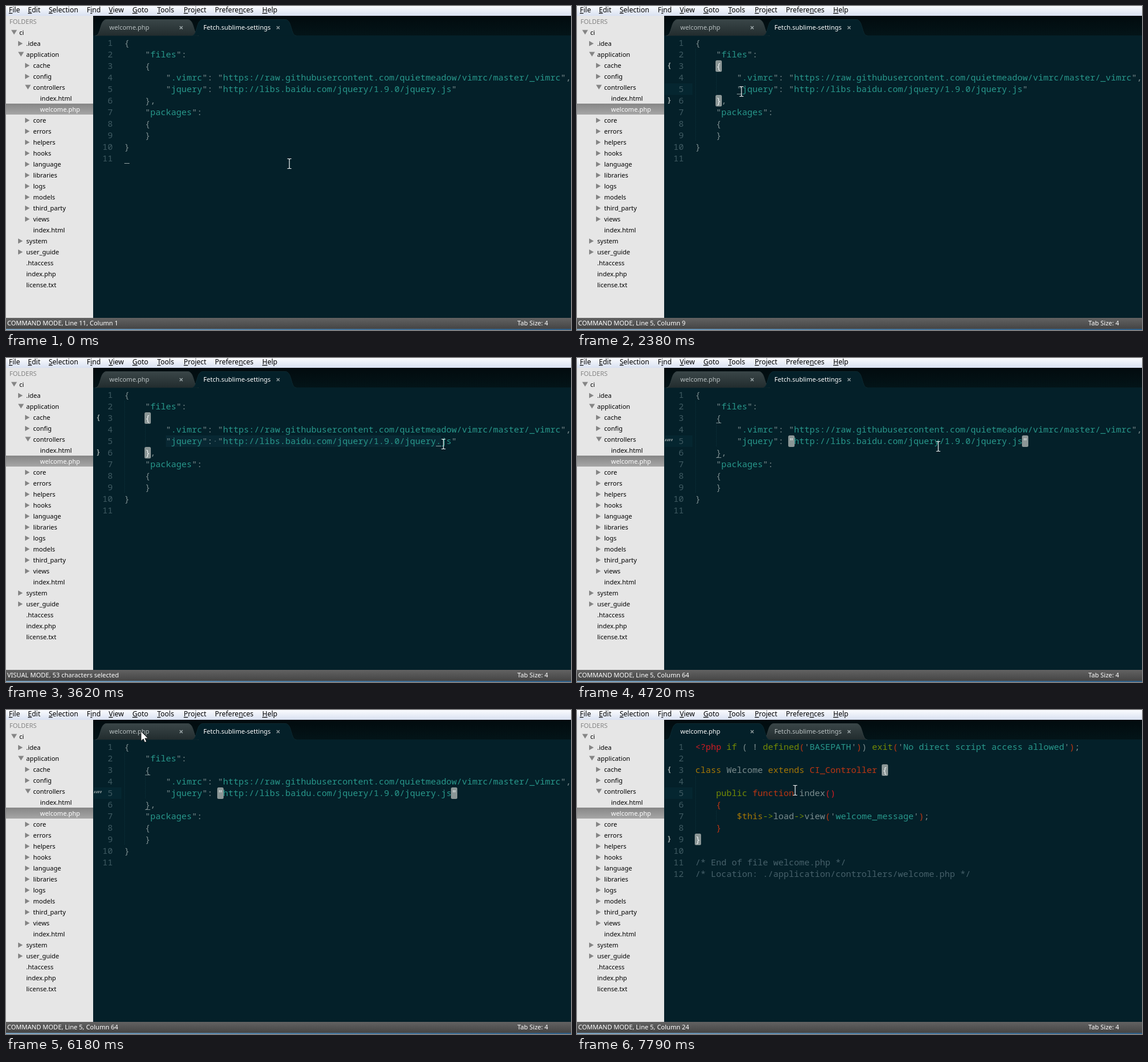
An HTML page for the animation above (8 s loop, 979x561 px).

```html
<!DOCTYPE html>
<html lang="en">
<head>
<meta charset="utf-8">
<title>Editor session</title>
<style>
  html, body { margin: 0; width: 100%; height: 100%; overflow: hidden; background: #042029; }
  svg { display: block; width: 979px; height: 561px; }
  text { white-space: pre; font: 11px "Noto Sans", "Open Sans", sans-serif; }
  .menu { font-size: 12px; }
  .menu tspan { text-decoration: underline; }
  .code { font: 15px "Noto Sans Mono", "Liberation Mono", monospace; fill: #7b8c8e; }
  .num { fill: #3f5a62; text-anchor: end; }
  .icon { font-weight: 700; font-size: 13px; fill: #93a1a1; }
  .marks { font-weight: 700; font-size: 16px; fill: #7d8c8e; }
  .lit { fill: #eef2f2; }
  .s { fill: #28978b; }
  .g { fill: #738a05; }
  .y { fill: #a57706; }
  .o { fill: #bd3613; }
  .r { fill: #d11c24; }
  .c { fill: #46606a; }
  .off { display: none; }
  .tab path { fill: url(#tabFill); stroke: #333f41; }
  .tab text { fill: #b9c1c2; }
  .tab .close { fill: none; stroke: #9aa5a7; stroke-width: 1.5; }
  .tab.active path { fill: #042029; stroke: #0d2931; }
  .tab.active text { fill: #fff; }
  .tab.active .close { fill: none; stroke: #8d999b; }
</style>
</head>
<body>
<svg id="stage" viewBox="0 0 979 561">
  <defs>
    <linearGradient id="menuFill" x2="0" y2="1"><stop stop-color="#fafbfe"/><stop offset="1" stop-color="#d9e1f1"/></linearGradient>
    <linearGradient id="tabFill" x2="0" y2="1"><stop stop-color="#3a4648"/><stop offset="1" stop-color="#222c2e"/></linearGradient>
    <linearGradient id="barFill" x2="0" y2="1"><stop stop-color="#020b0e"/><stop offset="1" stop-color="#031418"/></linearGradient>
    <linearGradient id="pickFill" x2="0" y2="1"><stop stop-color="#868686"/><stop offset="1" stop-color="#a6a6a6"/></linearGradient>
    <linearGradient id="statusFill" x2="0" y2="1"><stop stop-color="#626262"/><stop offset="1" stop-color="#454545"/></linearGradient>
    <linearGradient id="deskFill"><stop stop-color="#7fa6c4"/><stop offset=".5" stop-color="#4a7ba3"/><stop offset="1" stop-color="#2f5f88"/></linearGradient>
  </defs>
  <rect width="979" height="561" fill="#042029"/>
  <rect x="151" y="17" width="828" height="34" fill="url(#barFill)"/>
  <rect y="17" width="151" height="523" fill="#e6e6e6"/>
  <rect width="979" height="17" fill="url(#menuFill)"/>
  <g id="menu"></g>
  <g id="tree"></g>
  <g id="tabs"></g>
  <rect id="row5" x="152" y="134" width="48" height="20" fill="#052630"/>
  <g id="json"></g>
  <g id="php"></g>
  <rect id="caret" height="1" width="9" fill="#93a1a1"/>
  <rect y="540" width="979" height="19" fill="url(#statusFill)"/>
  <rect y="559" width="979" height="2" fill="url(#deskFill)"/>
  <text id="status" x="2" y="553" fill="#fff"></text>
  <text x="886" y="553" fill="#fff">Tab Size: 4</text>
  <path id="beam" d="M-3.5-8.5h2.5l1 1 1-1h2.5M0-7.500V7.500M-3.500 8.500h2.500l1-1 1 1h2.500" fill="none" stroke="#f4f6f6" stroke-width="1.2"/>
  <path id="arrow" d="M0 0V16.500L4 13 6.500 19 9.300 17.800 6.800 12H12Z" fill="#fff" stroke="#111" stroke-width=".8"/>
</svg>
<script>
const LOOP = 8000, CELL = 9, LEFT = 205;
const $ = id => document.getElementById(id);
const colX = col => LEFT + (col - 1) * CELL;
const rowTop = row => 54 + (row - 1) * 20;
const span = (cls, s) => `<tspan class="${cls}">${s}</tspan>`;

// Menu: the letter after & is underlined
const menu = [[5, '&File'], [38, '&Edit'], [74, '&Selection'], [140, 'F&ind'], [178, '&View'], [219, '&Goto'],
  [262, '&Tools'], [308, '&Project'], [362, 'Prefere&nces'], [444, '&Help']];
$('menu').innerHTML = menu.map(([x, s]) =>
  `<text class="menu" x="${x}" y="11">${s.replace(/&(.)/, '<tspan>$1</tspan>')}</text>`).join('');

// Sidebar: leading > give the depth, + closed folder, - open folder
const tree = `-ci|>+.idea|>-application|>>+cache|>>+config|>>-controllers|>>> index.html|>>> welcome.php|>>+core|>>+errors|
>>+helpers|>>+hooks|>>+language|>>+libraries|>>+logs|>>+models|>>+third_party|>>+views|>> index.html|>+system|
>+user_guide|> .htaccess|> index.php|> license.txt`.replace(/\n/g, '').split('|');
$('tree').innerHTML = '<text x="6" y="31" fill="#858585">FOLDERS</text>' + tree.map((item, i) => {
  const [, deep, kind, name] = item.match(/^(>*)([-+ ])(.*)$/);
  const x = 23 + 12 * deep.length, y = 46 + 19 * i, picked = name === 'welcome.php';
  const shape = { '+': 'v9l8-4.500z', '-': 'h10l-5 8z' }[kind];
  return (picked ? `<rect y="${y - 10}" width="151" height="19" fill="url(#pickFill)"/>` : '') +
    (shape ? `<path d="M${x - 14} ${y - 4.5}${shape}" fill="#858585"/>` : '') +
    `<text x="${x}" y="${y + 4}" fill="${picked ? '#fff' : '#000'}">${name}</text>`;
}).join('');

const tab = (id, a, b, textX, closeX, name) => `<g id="${id}" class="tab">
  <path d="M${a} 51.500C${a + 10} 51.500 ${a + 7} 23.500 ${a + 19} 23.500H${b - 19}C${b - 7} 23.500 ${b - 10} 51.500 ${b} 51.500"/>
  <text x="${textX}" y="41">${name}</text>
  <path class="close" d="M${closeX - 2.5} 35l5 5m0-5l-5 5" style="fill:none"/></g>`;
$('tabs').innerHTML = tab('tabPhp', 155, 334, 179, 303.5, 'welcome.php') +
  tab('tabJson', 322, 503, 342, 471.5, 'Fetch.sublime-settings');

// Code
const listing = lines => lines.map((s, i) => {
  const y = rowTop(i + 1) + 15;
  return `<text class="code num" x="185" y="${y}">${i + 1}</text><text class="code" x="${LEFT}" y="${y}">${s}</text>`;
}).join('');
const lit = (row, col, ch) => `<rect x="${colX(col) - 1}" y="${rowTop(row)}" width="11" height="20" rx="2.5" fill="#8b9696"/>
  <text class="code lit" x="${colX(col)}" y="${rowTop(row) + 15}">${ch}</text>`;
const icon = (row, s) => `<text class="code icon" x="156" y="${rowTop(row) + 13}">${s}</text>`;
const guide = (col, from, to) => `<path d="M${colX(col) + .5} ${rowTop(from)}V${rowTop(to) + 20}" stroke="#0d323b" stroke-dasharray="1 1"/>`;
const underline = row => `<rect x="241" y="${rowTop(row) + 18}" width="9" height="1" fill="#7b8c8e"/>`;
const fold = row => `<path d="M187 ${rowTop(row) + 5}h10l-5 8z" fill="#7f8b8c"/>`;

const json = `{
    "files":
    {
        ".vimrc": "https://raw.githubusercontent.com/quietmeadow/vimrc/master/_vimrc",
        "jquery": "http://libs.baidu.com/jquery/1.9.0/jquery.js"
    },
    "packages":
    {
    }
}
`.split('\n').map(s => s.replace(/"([^"]*)"/g, (_, t) => '"' + span('s', t) + '"'));

$('json').innerHTML = `<rect id="selection" x="277" y="134" height="20" fill="#082833"/>
  <g id="guides">${guide(1, 2, 9) + guide(5, 4, 5)}</g>${listing(json)}
  <text id="dot" class="code c" x="${colX(18)}" y="149">·</text>
  <g id="braces">${lit(3, 5, '{') + lit(6, 5, '}') + icon(3, '{') + icon(6, '}')}</g>
  <g id="quotes">${lit(5, 19, '"') + lit(5, 64, '"') + underline(3) + underline(6)}
    <text class="marks" x="152" y="152">“”</text></g>
  <g id="folds">${fold(1) + fold(3)}</g>`;

const [s, g, y, o, r, c] = [...'sgyorc'].map(cls => t => span(cls, t));
const php = [
  `${r('&lt;?php')} ${g('if')} ( ! ${g('defined')}${o('(')}'${s('BASEPATH')}'${o(')')}) ${g('exit')}${o('(')}'${s('No direct script access allowed')}'${o(')')};`,
  '',
  `${y('class')} Welcome ${y('extends')} ${o('CI_Controller')} {`,
  '',
  `    ${g('public')} ${o('function')} index${r('()')}`,
  `    ${o('{')}`,
  `        ${y('$this')}${g('-&gt;')}load${g('-&gt;')}view${o('(')}'${s('welcome_message')}'${o(')')};`,
  `    ${o('}')}`,
  '}',
  '',
  c('/* End of file welcome.php */'),
  c('/* Location: ./application/controllers/welcome.php */'),
];
$('php').innerHTML = guide(1, 4, 8) + guide(5, 7, 7) + listing(php) +
  lit(3, 37, '{') + lit(9, 1, '}') + icon(3, '{') + icon(9, '}');

// Pointer legs: first step, last step, step count, end x, end y
const legs = [
  [150, 430, 3, 434, 226], [880, 1400, 5, 308, 159], [1550, 1860, 3, 285, 148],
  [2510, 2770, 3, 770, 148], [3200, 3620, 4, 758, 149], [3750, 4210, 4, 778, 150],
  [4330, 4330, 1, 782, 159], [4720, 5170, 4, 157, 135], [5310, 5730, 4, 222, 21],
  [5880, 6180, 3, 234, 37], [6580, 6840, 3, 378, 139],
];
function pointer(t) {
  let x = 491, y = 273;
  for (const [from, to, n, ex, ey] of legs) {
    if (t < from) break;
    const gap = (to - from) / (n - 1) || 1;
    const k = Math.min(n, Math.floor((t - from) / gap + 1e-6) + 1) / n;
    x += (ex - x) * k;
    y += (ey - y) * k;
  }
  return [Math.round(x), Math.round(y)];
}

const show = (id, on) => $(id).classList.toggle('off', !on);
const within = (t, a, b) => t >= a && t < b;

function caretAt(t, chars) {
  if (t < 290) return [11, 1];
  if (within(t, 2000, 2510)) return [5, 9];
  if (within(t, 2510, 4720)) return [5, 8 + chars];
  if (within(t, 6310, 6840) || within(t, 7370, 7790)) return [5, 24];
  return null;
}

function statusAt(t, chars) {
  if (within(t, 2510, 4720)) return `VISUAL MODE, ${chars} characters selected`;
  const place = t < 2000 ? [11, 1] : t < 2510 ? [5, 9] : t < 6310 ? [5, 64] : [5, 24];
  return `COMMAND MODE, Line ${place[0]}, Column ${place[1]}`;
}

function draw(t) {
  const [x, y] = pointer(t);
  const visual = within(t, 2510, 4720), second = t >= 6310;
  const chars = Math.max(1, Math.min(56, Math.ceil((x - 281) / CELL)));
  const inEditor = x > 200 && y > 51;

  $('status').textContent = statusAt(t, chars);
  show('json', !second);
  show('php', second);
  $('tabPhp').classList.toggle('active', second);
  $('tabJson').classList.toggle('active', !second);
  const front = $(second ? 'tabPhp' : 'tabJson');
  if ($('tabs').lastElementChild !== front) $('tabs').append(front);

  show('row5', t >= 2000 && !visual);
  show('guides', t >= 2000);
  show('braces', within(t, 2000, 4720));
  show('quotes', t >= 4720);
  show('folds', t >= 4720 && x <= 200 && y > 51);
  show('selection', visual);
  show('dot', visual && chars > 9);
  $('selection').setAttribute('width', chars * CELL);

  const caret = caretAt(t, chars);
  show('caret', caret);
  if (caret) {
    $('caret').setAttribute('x', colX(caret[1]));
    $('caret').setAttribute('y', rowTop(caret[0]) + 18);
  }
  show('beam', inEditor);
  show('arrow', !inEditor);
  $(inEditor ? 'beam' : 'arrow').setAttribute('transform', `translate(${x} ${y})`);
}

const start = performance.now();
function frame() {
  draw((performance.now() - start) % LOOP);
  requestAnimationFrame(frame);
}
frame();
</script>
</body>
</html>
```
